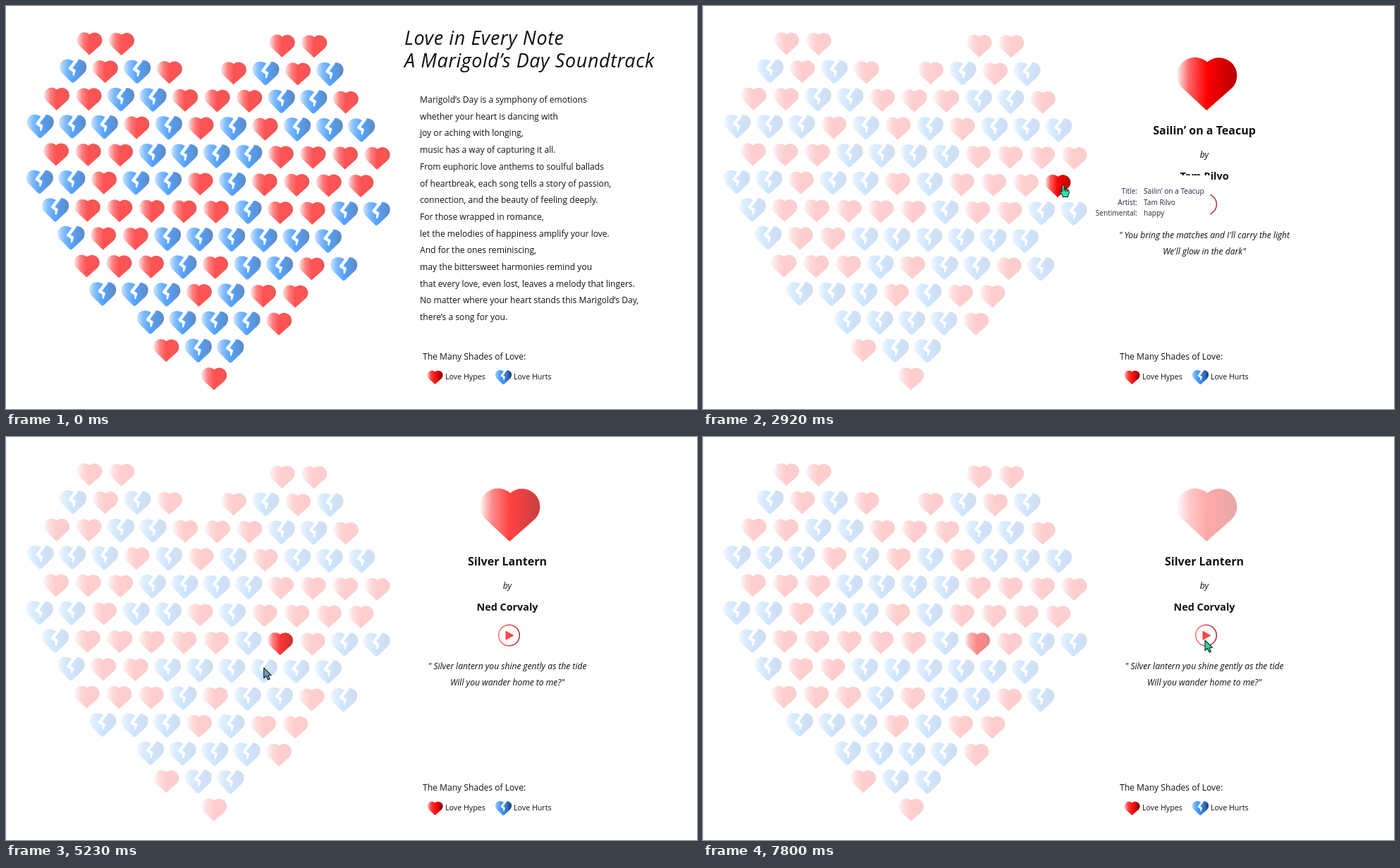
An HTML page for the animation above (8000 ms loop, 980 by 571 pixels).

```html
<!DOCTYPE html>
<html lang="en">
<head>
<meta charset="utf-8">
<title>Love in Every Note</title>
<style>
  html, body { margin: 0; width: 100%; height: 100%; overflow: hidden; background: #fff; }
  svg { display: block; }
  text { font: 12.1px "Open Sans", "Noto Sans", sans-serif; fill: #111; white-space: pre; }
  .headline { font-size: 27px; font-style: italic; letter-spacing: .6px; }
  .song text { text-anchor: middle; }
  .song .title { font-size: 16px; font-weight: 700; }
  .song .artist { font-size: 14.4px; font-weight: 700; }
  .song .it { font-style: italic; }
  .tip text { font-size: 10.1px; fill: #252440; }
  .tip .key { text-anchor: end; }
  .label { font-size: 10.7px; }
</style>
</head>
<body>
<svg id="stage" width="980" height="571" viewBox="0 0 980 571">
  <defs>
    <linearGradient id="red">
      <stop offset="0" stop-color="#fff0f0"/><stop offset=".2" stop-color="#ff6464"/>
      <stop offset=".5" stop-color="#f00"/><stop offset="1" stop-color="#b40000"/>
    </linearGradient>
    <linearGradient id="redSoft">
      <stop offset="0" stop-color="#ffdcdc"/><stop offset=".25" stop-color="#ff4a4a"/>
      <stop offset=".5" stop-color="#ff0808"/><stop offset=".8" stop-color="#f80c0c"/>
      <stop offset="1" stop-color="#d41414"/>
    </linearGradient>
    <linearGradient id="blue">
      <stop offset="0" stop-color="#b8daff"/><stop offset=".22" stop-color="#4ea2ff"/>
      <stop offset=".5" stop-color="#0c7cff"/><stop offset="1" stop-color="#1858a8"/>
    </linearGradient>
    <linearGradient id="redKey">
      <stop offset="0" stop-color="#ffc4c4"/><stop offset=".25" stop-color="#ff4040"/>
      <stop offset=".5" stop-color="#f81414"/><stop offset=".68" stop-color="#e80808"/>
      <stop offset="1" stop-color="#6c0000"/>
    </linearGradient>
    <linearGradient id="blueKey">
      <stop offset="0" stop-color="#9cccff"/><stop offset=".3" stop-color="#4a9cff"/>
      <stop offset=".6" stop-color="#3a86ea"/><stop offset="1" stop-color="#203c66"/>
    </linearGradient>
    <linearGradient id="ring">
      <stop offset="0" stop-color="#ff6a6a"/><stop offset=".5" stop-color="#ee4444"/>
      <stop offset="1" stop-color="#9c2020"/>
    </linearGradient>
    <path id="whole" d="M0 38.5L-36.1 5.9A25.5 25.5 0 0 1 0 -30A25.5 25.5 0 0 1 36.1 5.9Z"/>
    <path id="broken" d="M5 37Q0 41 -5 37L-37 6C-47 -5 -47 -22 -38 -31C-28 -41 -11 -41 0 -33C11 -41 28 -41 38 -31C47 -22 47 -5 37 6Z"/>
    <path id="crack" fill="#fff" d="M0 -42L17 -40L16 -34L-2 -10L8 -4Q10 -2 8 2L4 15Q1 18 -1 14L-1 3L-13 -5Q-16 -7 -14 -11L1 -32Z"/>
  </defs>
</svg>
<script>
const NS = 'http://www.w3.org/2000/svg';
const stage = document.getElementById('stage');
const LOOP = 8000;

function add(parent, tag, attrs = {}, text) {
  const el = document.createElementNS(NS, tag);
  for (const key in attrs) el.setAttribute(key, attrs[key]);
  if (text) el.textContent = text;
  return parent.appendChild(el);
}
const group = (cls = '', parent = stage) => add(parent, 'g', { class: cls });
const label = (parent, x, y, text, cls = '') => add(parent, 'text', { x, y, class: cls }, text);

function heart(parent, x, y, width, fill, broken) {
  const g = add(parent, 'g', { transform: `translate(${x} ${y}) scale(${width / 89}) rotate(.7)` });
  add(g, 'use', { href: broken ? '#broken' : '#whole', fill: `url(#${fill})` });
  if (broken) add(g, 'use', { href: '#crack' });
  return g;
}

// Heart field: first column of each row, then h = whole, b = broken
const rows = [
  [0, 'hh    hh'], [-.5, 'bhbh hbhb'], [-1, 'hhbbhhhbbh'], [-1.5, 'bbbhbhbhbbb'],
  [-1, 'hhhbbbbhhhh'], [-1.5, 'bbhbbhbhhhh'], [-1, 'bhhhhhbhhbb'], [-.5, 'bhhbbbbbb'],
  [0, 'hhhbhbbhb'], [.5, 'bbbhbhh'], [2, 'bbbbh'], [2.5, 'hbb'], [4, 'h']
];
function spot(row, i) {
  const x = 118.3 + 45.55 * (rows[row][0] + i) - .45 * row;
  return [x, 53 + 39.4 * row + .012 * (x - 118)];
}
const edge = add(stage, 'rect', { width: 1, height: 571, fill: '#e6e6e6' });
const field = group();
rows.forEach(([, kinds], r) => [...kinds].forEach((k, i) => {
  if (k !== ' ') heart(field, ...spot(r, i), 38, k === 'b' ? 'blue' : 'redSoft', k === 'b');
}));
const glowA = heart(stage, ...spot(5, 10), 38, 'red');
const glowB = heart(stage, ...spot(6, 7), 38, 'red');

// Legend
label(stage, 591, 501, 'The Many Shades of Love:');
heart(stage, 608.5, 526, 23, 'redKey');
label(stage, 623, 529, 'Love Hypes', 'label');
heart(stage, 705.5, 526, 23, 'blueKey', true);
label(stage, 720, 529, 'Love Hurts', 'label');

// Opening text
const intro = group();
label(intro, 565, 55, 'Love in Every Note', 'headline');
label(intro, 565, 87, 'A Marigold’s Day Soundtrack', 'headline');
[
  'Marigold’s Day is a symphony of emotions',
  'whether your heart is dancing with',
  'joy or aching with longing,',
  'music has a way of capturing it all.',
  'From euphoric love anthems to soulful ballads',
  'of heartbreak, each song tells a story of passion,',
  'connection, and the beauty of feeling deeply.',
  'For those wrapped in romance,',
  'let the melodies of happiness amplify your love.',
  'And for the ones reminiscing,',
  'may the bittersweet harmonies remind you',
  'that every love, even lost, leaves a melody that lingers.',
  'No matter where your heart stands this Marigold’s Day,',
  'there’s a song for you.'
].forEach((line, i) => label(intro, 587, 137 + 23.7 * i, line));

// Song cards
const card = group();
const bigHeart = heart(card, 714.7, 109.5, 89, 'red');
add(card, 'circle', { cx: 713.5, cy: 281, r: 14.8, fill: 'none', stroke: 'url(#ring)', 'stroke-width': 1.4 });
add(card, 'path', { d: 'M709 275.2L719.6 281.2L709 287.2Z', fill: '#ff4646', stroke: '#ff4646', 'stroke-linejoin': 'round' });

function song(title, artist, first, second) {
  const g = group('song', card);
  label(g, 711, 182, title, 'title');
  label(g, 711, 215, 'by', 'it');
  label(g, 711, 246, artist, 'artist');
  label(g, 711, 328.5, first, 'it');
  label(g, 711, 351.5, second, 'it');
  return g;
}
const songA = song('Sailin’ on a Teacup', 'Tam Rilvo',
  '" You bring the matches and I\'ll carry the light', 'We\'ll glow in the dark"');
const songB = song('Silver Lantern', 'Ned Corvaly',
  '" Silver lantern you shine gently as the tide', 'Will you wander home to me?"');

const tip = group('tip');
add(tip, 'rect', { x: 546, y: 240, width: 173, height: 64, fill: '#fff' });
[['Title:', 'Sailin’ on a Teacup'], ['Artist:', 'Tam Rilvo'], ['Sentimental:', 'happy']]
  .forEach(([key, value], i) => {
    label(tip, 616, 266 + 15.5 * i, key, 'key');
    label(tip, 625, 266 + 15.5 * i, value);
  });

// Pointer, both shapes with the tip at 0,0
const pointer = group();
const ink = { stroke: '#10241f', 'stroke-width': 1.1, 'stroke-linejoin': 'round' };
const arrow = add(pointer, 'path', { ...ink, d: 'M0 0L0 14.5L3.4 11.4L6 17L8.4 15.9L6 10.6L10.4 10.2Z' });
const hand = add(pointer, 'g', { transform: 'translate(.8 .3) scale(.93)' });
add(hand, 'path', { ...ink, fill: '#2fe6b0',
  d: 'M-1.6 1Q0 -1 1.6 1V7Q3.2 5.8 4.2 7.4Q5.8 6.4 6.6 8Q8.8 7.2 9 9.6V13Q8.6 15 7.4 16.5V18.5H-.6V16.5L-4.8 11.4Q-5.2 9 -3 9.6L-1.6 11Z' });
add(hand, 'path', { ...ink, fill: 'none', d: 'M1.6 7V10M4.2 7.4V10.4M6.6 8V10.6' });

// time, x, y
const track = [
  [330, 572, 560], [700, 536, 440], [960, 510, 254], [2920, 510, 253], [3300, 472, 262],
  [3690, 410, 288], [3950, 390, 302], [4250, 387, 297], [4740, 387, 297], [5200, 366, 326],
  [5400, 364, 333], [6190, 364, 333], [6900, 632, 287], [7110, 722, 278], [7300, 733, 284],
  [7500, 722, 290], [7730, 714, 286], [7800, 712, 288], [LOOP, 712, 288]
];
function pointAt(t) {
  const i = track.findIndex(p => p[0] > t);
  if (i < 1) return track[0].slice(1);
  const [t0, x0, y0] = track[i - 1], [t1, x1, y1] = track[i];
  const k = (t - t0) / (t1 - t0);
  return [x0 + (x1 - x0) * k, y0 + (y1 - y0) * k];
}

// Rise, short plateau, linear fall, rest
function pulse(t) {
  const u = (t - 90 + 2010) % 2010, low = .34;
  const k = u < 600 ? u / 600 : u < 820 ? 1 : Math.max(0, 1 - (u - 820) / 790);
  return low + (1 - low) * k;
}
const clamp = v => Math.min(1, Math.max(0, v));
const show = (el, on) => el.setAttribute('visibility', on ? 'inherit' : 'hidden');

function draw(t) {
  const p = pulse(t);
  field.style.opacity = .7 - .5 * clamp((t - 1000) / 300);
  show(edge, t >= 330);
  show(glowA, t >= 1030 && t < 4740);
  show(glowB, t >= 4250);
  for (const el of [glowA, glowB, bigHeart]) el.style.opacity = p;

  show(intro, t < 1730);
  show(card, t >= 1730);
  show(songA, t >= 1730 && t < 4740);
  show(songB, t >= 4740);
  show(tip, t >= 1940 && t < 3060);

  const [x, y] = pointAt(t);
  const onHeart = t >= 930 && t < 4950;
  pointer.setAttribute('transform', `translate(${x} ${y})`);
  show(pointer, t >= 330);
  show(hand, t >= 330 && onHeart);
  show(arrow, t >= 330 && !onHeart);
  arrow.setAttribute('fill', t < 6190 ? '#7a9cba' : '#25dc9c');
}

const start = performance.now();
function tick() {
  draw((performance.now() - start) % LOOP);
  requestAnimationFrame(tick);
}
draw(0);
requestAnimationFrame(tick);
</script>
</body>
</html>
```
